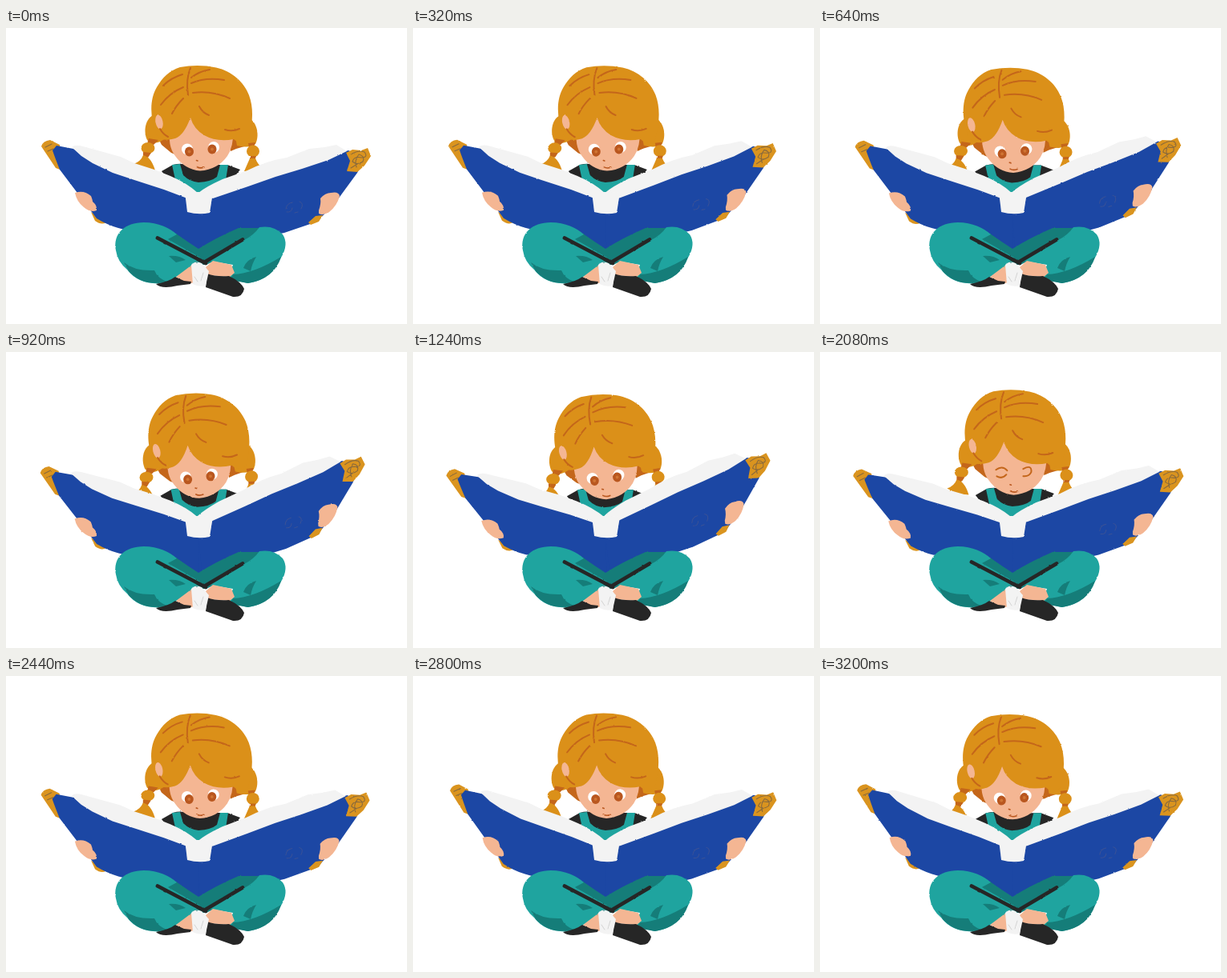
These frames come from a looping animation (500 px wide and 370 px high, 3.24 s). An HTML page:

```html
<!DOCTYPE html>
<html lang="en">
<head>
<meta charset="utf-8">
<title>Girl reading</title>
<style>
  html, body { margin: 0; width: 100%; height: 100%; overflow: hidden; background: #fff; }
  svg { display: block; width: 500px; height: 370px; }
  .hair { fill: #db9019; } .shade { fill: #c4661a; } .skin { fill: #f4b693; }
  .teal { fill: #1fa49f; } .deep { fill: #157d79; } .ink { fill: #262626; }
  .blue { fill: #1c47a4; } .page { fill: #f3f3f3; } .gold { fill: #da941f; }
  .iris { fill: #b9571f; }
  .line { fill: none; stroke-linecap: round; stroke-linejoin: round; }
  .crease { stroke: #c4661a; stroke-width: 2; }
  .scribble { stroke: #8a6a3c; stroke-width: 1.1; }
</style>
</head>
<body>
<svg viewBox="0 0 500 370">
  <defs>
    <filter id="brush" filterUnits="userSpaceOnUse" x="0" y="0" width="500" height="370" color-interpolation-filters="sRGB">
      <feTurbulence type="fractalNoise" baseFrequency=".25" numOctaves="2" seed="4"/>
      <feDisplacementMap in="SourceGraphic" scale="1.8" xChannelSelector="R" yChannelSelector="G"/>
    </filter>
  </defs>
  <g filter="url(#brush)">
    <g id="torso">
      <path class="ink" d="M194 179 L208 171 Q220 168 226 172 L262 171 L276 171 L292 177 L272 202 H212Z"/>
      <path class="teal" d="M207 171 L217 170 L221 184 Q229 192 240 193 Q256 192 263 186 L267 171 L277 171 L274 190 L250 214 H234 L212 194Z"/>
    </g>

    <g id="head">
      <path class="shade" d="M187 132 L194 146 L206 156 L213 159 L218 130Z M276 130 L280 154 L287 151 L304 146 V128Z"/>
      <path class="hair" d="M186 108 C173 112 171 130 176 140 Q185 148 199 138Z"/>
      <path class="hair" d="M302 112 C314 118 316 135 311 145 Q304 151 288 147 L286 136Z"/>
      <path class="shade" d="M178 138 L190 140 L184 146 L176 145Z M302 144 L311 143 L309 149 L303 149Z"/>
      <ellipse class="hair" cx="177" cy="150" rx="8.5" ry="7"/>
      <ellipse class="hair" cx="308" cy="154" rx="8" ry="7.5"/>
      <path class="shade" d="M171 155 L181 156 L177 162 L171 160Z M304 160 L312 160 L310 166 L304 166Z"/>
      <path class="hair" d="M171 159 Q181 161 186 178 L172 177 L159 170 Q168 167 171 159Z M304 163 L311 163 Q314 171 320 175 L308 180 L297 179Z"/>
      <path class="skin" d="M205 125 Q201 147 211 160 Q223 177 242 178.500 Q264 177 276 160 Q284 148 283 128 L229 108Z"/>
      <g id="eyes">
        <ellipse cx="226" cy="151.500" rx="7" ry="7" fill="#fff"/>
        <ellipse cx="259" cy="149" rx="7" ry="7" fill="#fff"/>
        <ellipse class="iris" cx="228.500" cy="154.500" rx="5.500" ry="6"/>
        <ellipse class="iris" cx="257" cy="151.500" rx="5.500" ry="6"/>
        <circle cx="228.500" cy="154.500" r="2" fill="#cf7433"/>
        <circle cx="257" cy="151.500" r="2" fill="#cf7433"/>
      </g>
      <path id="lids" class="line crease" d="M220 147 Q228 141 234 148 M221 155 Q228 159 233 153 M254 146 Q265 140 264 150 Q261 156 254 155"/>
      <path class="line" stroke="#b9571f" stroke-width="1.6" d="M238 173.500 Q242 176 247 174 M237.500 165.500 L239 166"/>
      <path class="hair" d="M188 134 C179 112 179 89 188 74 C195 62 204 53 217 49 Q240 45 262 49.500 C282 54 297 68 303 84 C309 100 308 120 302 140 Q294 148 284 139 Q263 143 247 134 Q234 126 230 112 Q222 134 211 138 Q195 143 188 134Z"/>
      <ellipse class="skin" cx="191" cy="117.500" rx="4.500" ry="9" transform="rotate(-12 191 117.500)"/>
      <path class="line crease" d="M230 50 Q224 64 227 84 M220 58 Q206 62 196 72 M221 74 Q204 81 193 96 M221 88 Q212 97 207 107 M231 62 Q241 54 254 52 M231 69 Q249 61 272 65 M233 81 Q257 78 279 88 M241 98 Q245 106 253 109 M192 126 Q196 133 202 136 M273 127 Q282 130 291 126"/>
    </g>

    <path class="blue" d="M160 215 L225 208 L258 210 L330 212 L325 262 L240 282 L160 262Z"/>
    <g id="left">
      <path class="gold" d="M44 148 Q46 141 55 140 L67 146 L70 178 L62 175Z M106 230 L125 243 Q119 247 111 241Z"/>
      <path class="line scribble" d="M49 149 L57 145 M52 154 L59 151"/>
      <path class="blue" d="M63 147 L84 151 L150 180 L240 208 V276 L140 250 Q126 246 113 238 L67 177 Q61 162 58 153Z"/>
      <path class="page" d="M82 149 Q86 145 96 148 L143 161 L160 169 L185 177 L205 185 Q226 194 239 206 L234 216 L197 202 L160 190 L133 181 L108 169 L94 160Z"/>
      <path class="skin" d="M86 206 Q97 202 106 210 Q108 215 108 217 Q114 222 113 228 Q105 231 97 224 Q88 217 86 206Z"/>
    </g>
    <g id="right">
      <path class="blue" d="M240 212 L330 183 L427 153 L447 163 L438 181 L411 218 L388 242 L347 256 L240 278Z"/>
      <path class="page" d="M240 206 Q248 199 270 189 L301 178 Q325 166 350 162 L378 151 L397 149 L412 146 L425 154 L402 165 L369 176 L336 186 L302 198 L258 213Z"/>
      <path class="gold" d="M424 156 L432 152 L443 153 L451 150 L455 160 L447 172 L438 180 L425 179 L429 166Z M377 243 L386 235 L395 234 L390 242 L380 246Z"/>
      <path class="line scribble" d="M430 158 Q440 152 447 155 Q452 162 443 162 Q434 160 432 167 Q438 172 445 167 Q448 160 440 158 Q434 165 437 174 M430 175 L438 170"/>
      <path class="line" stroke="#3a5297" stroke-width="1" d="M349 226 Q350 219 357 218 M350 230 Q356 231 357 225 M366 217 Q372 219 368 226 M364 230 L360 231"/>
      <path class="skin" d="M390 228 Q393 220 392 213 Q398 206 405 206 Q415 204 416 210 Q413 222 403 230 Q395 235 390 232Z"/>
    </g>
    <path class="page" d="M223 205 L241 205 L258 206 L254 231 Q240 234 226 230Z"/>

    <path class="deep" d="M194 260 L212 257 Q226 267 240 276 Q262 262 290 250 L318 250 L296 272 L250 296 H226Z"/>
    <path class="teal" d="M137 278 C133 257 148 243 172 243 C190 243 204 250 213 258 L202 264 L242 287 L231 297 Q218 310 197 319 Q166 322 151 302 Q139 292 137 278Z"/>
    <path class="teal" d="M253 291 L297 265 Q309 259 316 249 Q334 246 345 258 Q353 270 343 287 Q331 315 301 319 L277 313 L283 296Z"/>
    <path class="deep" d="M147 293 Q160 304 185 303 Q189 313 201 317 Q171 324 153 304Z M203 285 Q216 284 224 290 L212 293Z M283 308 Q309 307 343 286 Q334 314 302 319 L279 315Z M296 300 Q300 289 312 286 Q307 294 305 304Z"/>
    <path class="skin" d="M212 311 L232 296 L240 317 L226 320Z M249 299 L258 291 L281 296 L285 306 L279 311 L253 309Z"/>
    <path class="ink" d="M187 320 Q203 317 211 311 L222 316 L231 317 L230 320 L214 322 Q194 327 187 320Z M251 307 Q261 311 278 310 Q293 317 297 326 Q295 337 283 336 L249 324Z"/>
    <path class="page" d="M231 296 Q236 290 244 294 L253 304 L249 322 Q240 324 233 320Z"/>
    <path class="line" stroke="#d3d3d3" stroke-width="1" d="M246 306 L243 316 M235 311 L239 317"/>
    <path class="line" stroke="#262626" stroke-width="4.800" d="M189 262.500 L249 294 M295 264.500 L247 293"/>
  </g>
</svg>
<script>
  const LOOP = 3240, STEP = 40;
  // time, head x, head y, head tilt, left half angle, right half angle
  const poses = [
    [0, 0, 0, 0, 0, 0],
    [250, 0, -0.3, -0.1, 0.1, -1.2],
    [640, -1.4, 2.6, -1.2, -0.2, -3.6],
    [1240, -2.2, 5.8, -3, -1.9, -6.6],
    [1600, -2.6, 4.8, -3, -3, -4.7],
    [2080, -0.6, 0.2, -0.2, -2, -1.3],
    [2450, -0.2, -0.6, 0, -0.2, -1.2],
    [2800, -0.8, -0.6, -0.1, 1.4, -1.3],
    [3200, -2.2, 0.9, -1, 1.5, -1.5]
  ];
  const el = id => document.getElementById(id);
  const [torso, head, eyes, lids, left, right] =
    ['torso', 'head', 'eyes', 'lids', 'left', 'right'].map(el);

  function slope(i, k) {
    const a = poses[Math.max(0, i - 1)], b = poses[Math.min(poses.length - 1, i + 1)];
    return (b[k] - a[k]) / (b[0] - a[0]);
  }

  function sample(t, k) {
    let i = 0;
    while (i < poses.length - 2 && t > poses[i + 1][0]) i++;
    const a = poses[i], b = poses[i + 1], span = b[0] - a[0];
    const u = Math.min(1, (t - a[0]) / span), v = 1 - u;
    return v * v * (1 + 2 * u) * a[k] + u * u * (3 - 2 * u) * b[k]
      + span * u * v * (v * slope(i, k) - u * slope(i + 1, k));
  }

  function draw(t) {
    const [x, y, tilt, l, r] = [1, 2, 3, 4, 5].map(k => sample(t, k));
    head.setAttribute('transform', `translate(${x} ${y}) rotate(${tilt} 240 155)`);
    torso.setAttribute('transform', `translate(${tilt * 0.7} ${y * 0.2})`);
    left.setAttribute('transform', `rotate(${l} 240 230)`);
    right.setAttribute('transform', `rotate(${r} 240 230)`);
    const shut = Math.abs(t - 2080) <= 80;
    lids.style.display = shut ? '' : 'none';
    eyes.style.display = shut ? 'none' : '';
  }

  const start = performance.now();
  function tick() {
    const t = (performance.now() - start) % LOOP;
    draw(Math.floor(t / STEP) * STEP);
    requestAnimationFrame(tick);
  }
  draw(0);
  requestAnimationFrame(tick);
</script>
</body>
</html>
```
